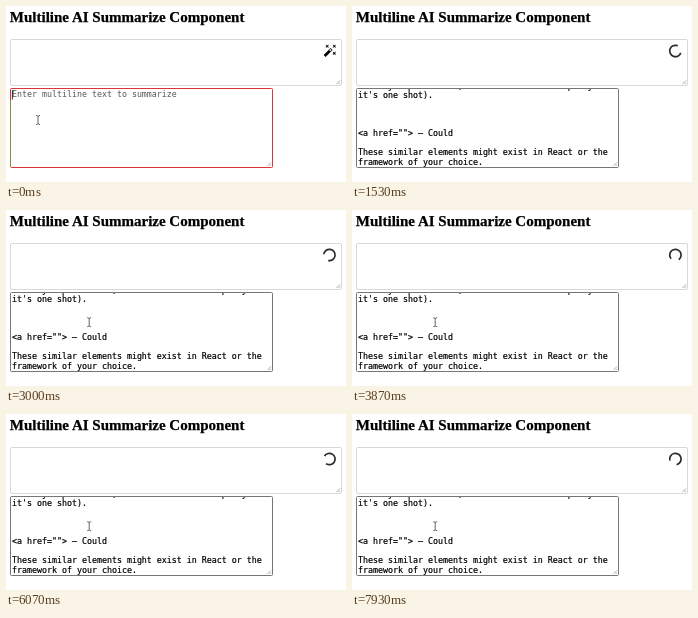
An HTML page for the animation above (8 s loop, 340 by 176 pixels).

```html
<!DOCTYPE html>
<html lang="en">
<head>
<meta charset="utf-8">
<title>Multiline summarize</title>
<style>
  html, body { margin: 0; width: 100%; height: 100%; overflow: hidden; background: #fff; }
  svg { display: block; width: 340px; height: 176px; }
  .title { font: bold 15px "Liberation Serif", serif; stroke: #000; stroke-width: .25px; }
  .mono { font: 8.306px "DejaVu Sans Mono", monospace; white-space: pre; }
  #body { stroke: #000; stroke-width: .2px; }
</style>
</head>
<body>
<svg viewBox="0 0 340 176">
  <defs>
    <clipPath id="inside"><rect x="5" y="83" width="261" height="78"/></clipPath>
    <path id="star" d="M0 1.4L2.9 2.9L1.4 0L2.9 -2.9L0 -1.4L-2.9 -2.9L-1.4 0L-2.9 2.9Z"/>
    <path id="grip" d="M-4.5 -1L-1 -4.5M-2.2 -1L-1 -2.2" fill="none" stroke="#888" stroke-width=".7"/>
  </defs>

  <text class="title" x="3.8" y="16.4">Multiline AI Summarize Component</text>

  <rect x="4.5" y="33.5" width="331" height="46" rx="1.5" fill="#fff" stroke="#d8d8d8"/>
  <use href="#grip" x="335" y="79"/>

  <g id="wand" transform="translate(316.8 37.6) scale(.59)">
    <use href="#star" x="7.5" y="4.5"/>
    <use href="#star" x="19.5" y="4.5"/>
    <use href="#star" x="19.5" y="16.5"/>
    <path d="M3.1 20.9L14.9 9.1" stroke="#000" stroke-width="4.6"/>
    <path d="M11.8 12.2L14 10" stroke="#fff" stroke-width="2.4"/>
  </g>
  <circle id="spinner" cx="323.4" cy="45" r="5.7" fill="none" stroke="#2a2a2a" stroke-width="1.7"
    pathLength="360" stroke-dasharray="275 85"/>

  <rect id="area" x="4.5" y="82.5" width="262" height="79" rx="1" fill="#fff"/>
  <path id="edge" d="M4.5 94V161" stroke="#8c8a3c"/>
  <use href="#grip" x="266" y="161"/>
  <text id="hint" class="mono" x="6" y="91" fill="#555">Enter multiline text to summarize</text>
  <g id="body" clip-path="url(#inside)"></g>
  <path id="caret" d="M0 -7.5V2" stroke="#000" stroke-width=".8"/>
  <path id="beam" d="M-2 -4.5Q0 -4.5 0 -3.3Q0 -4.5 2 -4.5M0 -3.3V3.3M-2 4.5Q0 4.5 0 3.3Q0 4.5 2 4.5"
    fill="none" stroke="#555" stroke-width=".9"/>
</svg>
<script>
const LOOP = 8000, STEP = 1000 / 15;
const PASTE = 1065, BLUR = 1530, POINTER_BACK = 2660;
const $ = id => document.getElementById(id);
const show = (id, on) => $(id).setAttribute('visibility', on ? 'visible' : 'hidden');
const move = (id, x, y) => $(id).setAttribute('transform', `translate(${x} ${y})`);

const lines = [
  'Usually a pass often, there is no chat to parry',
  "it's one shot).", '', '', '',
  '<a href=""> – Could', '',
  'These similar elements might exist in React or the',
  'framework of your choice.'
];
lines.forEach((line, i) => {
  const el = document.createElementNS('http://www.w3.org/2000/svg', 'text');
  el.setAttribute('class', 'mono');
  el.setAttribute('x', 6);
  el.setAttribute('y', 82.7 + i * 9.5);
  el.textContent = line;
  $('body').append(el);
});

function draw(time) {
  const t = Math.floor(time / STEP + 0.05) * STEP;
  const pasted = t >= PASTE, busy = t >= BLUR;

  show('hint', !pasted);
  show('body', pasted);
  show('edge', !busy);
  $('area').setAttribute('stroke', busy ? '#767676' : '#d8353a');

  const blinkOff = t > 430 && t < 930;
  show('caret', !busy && !blinkOff);
  if (pasted) move('caret', 131.4, 158.7);
  else move('caret', 6.4, 91.5);

  const p = Math.min(1, Math.max(0, (t - 66) / 534));
  const ease = p * p * (3 - 2 * p);
  show('beam', !pasted || t >= POINTER_BACK);
  move('beam', 32 + 51.2 * ease, 114 - 1.8 * ease);

  show('wand', !busy);
  show('spinner', busy);
  // The gap is centred at 145° on whole seconds; one turn per second.
  $('spinner').setAttribute('transform', `rotate(${187.5 + t * 0.36} 323.4 45)`);
}

const start = performance.now();
function tick() {
  draw((performance.now() - start) % LOOP);
  requestAnimationFrame(tick);
}
tick();
</script>
</body>
</html>
```
